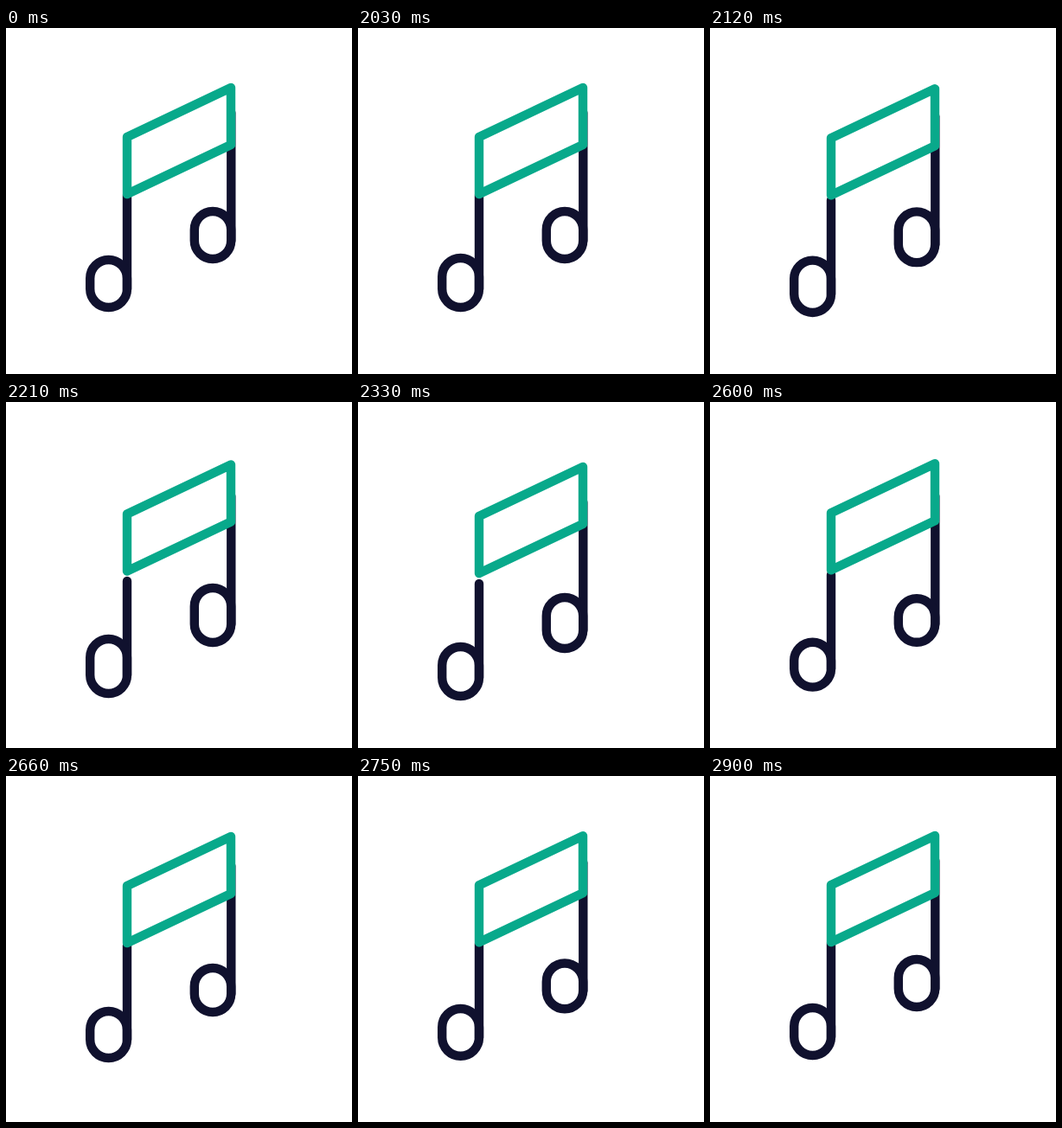
An HTML page for the animation above (2990 ms loop, 400 px wide and 400 px high).

```html
<!DOCTYPE html>
<html lang="en">
<head>
<meta charset="utf-8">
<title>Bouncing music note</title>
<style>
  html, body { margin: 0; width: 100%; height: 100%; overflow: hidden; background: #fff; }
  svg { display: block; width: 100%; height: 100%; }
</style>
</head>
<body>
<svg viewBox="0 0 400 400" fill="none" stroke-width="10.4" stroke-linecap="round" stroke-linejoin="round">
  <g stroke="#10112e">
    <path id="leftStem"/><rect id="leftHead" x="97.2" width="42.8" rx="21.4"/>
    <path id="rightStem"/><rect id="rightHead" x="217.8" width="42.4" rx="21.2"/>
  </g>
  <path id="beam" stroke="#08a98b" d="M140 126L260 69V135L140 192Z"/>
</svg>
<script>
const LOOP = 2990, START = 2030, END = 2900, STEP = 30;
const times = [2030, 2210, 2330, 2510, 2660, 2900];
const tracks = {
  beam: [0, 3.5, 6, 4.5, 1, 0],
  leftTop: [266, 274, 283, 287, 272, 268],
  leftBottom: [323, 337, 340, 336, 326, 323],
  rightTop: [212, 215, 226, 234, 222, 212],
  rightBottom: [267, 278, 285, 284, 273, 267]
};
const rest = { beam: 0, leftTop: 268, leftBottom: 323, rightTop: 212, rightBottom: 267 };
const el = id => document.getElementById(id);

// Slope at a key: flat at both ends, limited where the motion keeps its direction
function slope(v, i) {
  if (i === 0 || i === v.length - 1) return 0;
  const h0 = times[i] - times[i - 1], h1 = times[i + 1] - times[i];
  const d0 = (v[i] - v[i - 1]) / h0, d1 = (v[i + 1] - v[i]) / h1;
  const m = (d0 * h1 + d1 * h0) / (h0 + h1);
  if (d0 * d1 <= 0) return m;
  return Math.sign(m) * Math.min(Math.abs(m), 3 * Math.abs(d0), 3 * Math.abs(d1));
}

function sample(v, t) {
  let i = 0;
  while (i < times.length - 2 && t >= times[i + 1]) i++;
  const h = times[i + 1] - times[i], u = (t - times[i]) / h, w = 1 - u;
  return v[i] * w * w * (1 + 2 * u) + v[i + 1] * u * u * (3 - 2 * u)
    + h * u * w * (slope(v, i) * w - slope(v, i + 1) * u);
}

function poseAt(t) {
  if (t < START || t >= END) return rest;
  const stepped = START + Math.floor((t - START) / STEP) * STEP;
  return Object.fromEntries(Object.entries(tracks).map(([k, v]) => [k, sample(v, stepped)]));
}

function drawNote(side, x, stemLength, top, bottom) {
  el(side + 'Stem').setAttribute('d', `M${x} ${bottom - stemLength}V${bottom - 21}`);
  el(side + 'Head').setAttribute('y', top);
  el(side + 'Head').setAttribute('height', bottom - top);
}

function draw(now) {
  const p = poseAt(now % LOOP);
  drawNote('left', 140, 130, p.leftTop, p.leftBottom);
  drawNote('right', 260.3, 169, p.rightTop, p.rightBottom);
  el('beam').setAttribute('transform', `translate(0 ${p.beam})`);
}

const begin = performance.now();
function tick() {
  draw(performance.now() - begin);
  requestAnimationFrame(tick);
}
tick();
</script>
</body>
</html>
```
